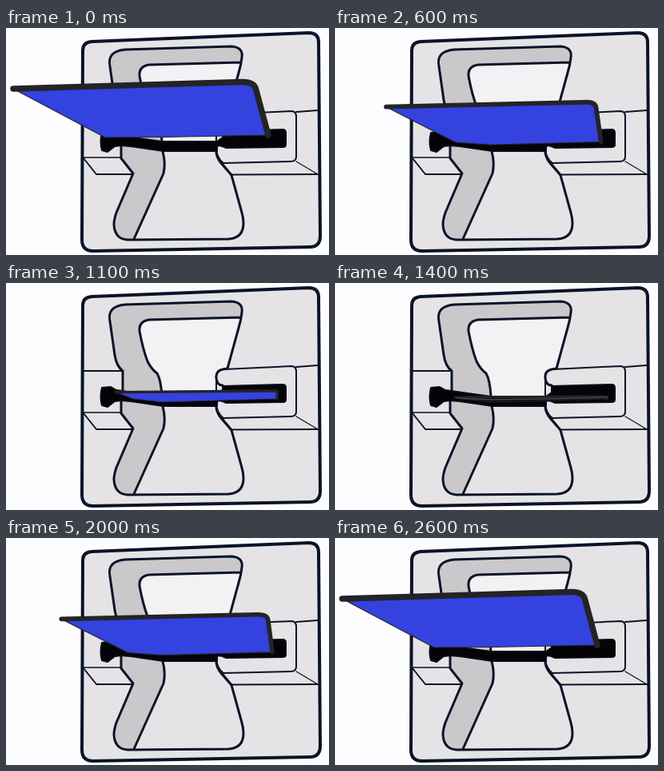
Animation, 404 px wide and 284 px high, one loop 2700 ms. Source, as an HTML page:

```html
<!DOCTYPE html>
<html lang="en">
<head>
<meta charset="utf-8">
<title>Folding flap</title>
<style>
html, body { margin: 0; width: 100%; height: 100%; overflow: hidden; background: #fdfcfe; }
svg { display: block; width: 404px; height: 284px; }
.line { fill: none; stroke: #0a1428; stroke-width: 3; stroke-linejoin: round; stroke-linecap: round; }
.thin { stroke-width: 2; }
.hair { stroke-width: 1.3; }
.plate { fill: #e5e3e5; }
.gray { fill: #cac8ca; }
.window { fill: #f2f1f3; }
.black { fill: #040407; stroke: #070c18; stroke-width: 2; stroke-linejoin: round; }
.flap { stroke: #242326; stroke-linejoin: round; stroke-linecap: round; }
</style>
</head>
<body>
<svg viewBox="0 0 404 284">
  <path class="plate line" style="stroke-width:4" d="M107 17L379 6Q391 6 391 18L393 260Q393 274 380 274L109 279Q95 279 95 265L96 28Q96 18 107 17Z"/>

  <!-- upper recess and window -->
  <path class="gray" d="M149 27L282 23Q297 24 295 37L294 43L179 46Q166 48 167 60Q171 82 177 98Q182 108 189 113Q194 122 195 142L146 134V110Q138 104 136 90L130 48Q126 29 149 27Z"/>
  <path class="window" d="M294 43L179 46Q166 48 167 60Q171 82 177 98Q182 108 189 113Q194 122 195 142H270L264 118L277 107Z"/>
  <path class="line" d="M146 134V110Q138 104 136 90L130 48Q126 29 149 27L282 23Q297 24 295 37Q294 46 291 56L277 107M294 43L179 46Q166 48 167 60Q171 82 177 98Q182 108 189 113Q194 122 195 142"/>

  <!-- lower recess -->
  <path class="gray" d="M144 147L196 154Q200 170 197 182L160 264H150Q135 262 135 248Q135 240 138 231L159 182L144 163Z"/>
  <path class="line" d="M196 154Q200 170 197 182L160 264M144 148V163L159 182L138 231Q135 240 135 246Q136 264 152 265L278 264Q297 263 297 244Q297 238 295 231L282 184"/>

  <!-- left block -->
  <path class="line thin" d="M97 110H146M97 163L113 183H158"/>
  <path class="line hair" d="M97 162H144"/>

  <!-- right block -->
  <path class="plate line thin" d="M272 108L357 104Q363 104 363 111V161Q363 167 356 167L272 169Q263 162 263 150V118Q263 109 272 108Z"/>
  <path class="line hair" d="M363 167L390 183"/>
  <path class="line thin" d="M363 105L390 103M270 169L282 183.5L390 183"/>
  <path class="line" d="M277 107L271 108Q262 110 263 119Q264 128 271 128M263 148V156Q264 163 269 169L282 184"/>

  <!-- slot and bar -->
  <path class="black" d="M120 131L131 130L138 134L195 142H264L271 137V129L346 127Q350 127 350 131V146Q350 149 346 149L275 150Q268 146 264 148V154H197L156 148L144 147L136 148L127 155L120 153Q117 142 120 131Z"/>

  <path id="face" class="flap" stroke-width="1.2"/>
  <path id="rim" class="flap" fill="none"/>
  <path id="shine" class="line hair" style="stroke:#4a4446" d="M152 144L195 146L262 145L341 143"/>
</svg>
<script>
const el = id => document.getElementById(id);
const LOOP = 2700, STEP = 100;

// time, how far the flap is open
const keys = [[0, 1], [400, 0.71], [600, 0.61], [800, 0.37], [1200, 0], [1400, 0],
  [1800, 0.42], [2200, 0.725], [2400, 0.966], [2500, 1], [LOOP, 1]];

const mix = (a, b, k) => a + (b - a) * k;
const between = (p, q, k) => p.map((v, i) => mix(v, q[i], k));

function openAt(t) {
  const i = keys.findIndex(k => k[0] > t);
  const [a, u] = keys[i - 1], [b, v] = keys[i];
  return mix(u, v, (t - a) / (b - a));
}

function draw(now) {
  const t = Math.floor(now % LOOP / STEP) * STEP;
  const u = openAt(t), shut = u === 0;
  const rise = u + 0.35 * u * u * (1 - u), sink = u ** 3;

  // free edge swings up, hinge edge barely moves
  const tip = [150 - 141 * u, 143 - 67 * rise];
  const corner = [341 - 31 * u ** 1.4, 142 - 75 * rise];
  const right = [340 - 12 * u, 145 - 11 * sink];
  const middle = [195, 149 - 12.5 * sink];
  const left = [159 - 35 * sink, 145 - 8 * sink];

  const rim = `M${tip}L${between(tip, corner, 0.95)}Q${corner} ${between(corner, right, 0.14)}L${right}`;
  el("rim").setAttribute("d", rim);
  el("rim").setAttribute("stroke-width", 3 + 4.5 * u);
  el("face").setAttribute("d", `${rim}L${middle}L${left}Z`);
  el("face").setAttribute("fill", shut ? "#0b0a0c" : "#3442e0");
  el("shine").setAttribute("visibility", shut ? "visible" : "hidden");
}

const start = performance.now();
function tick() {
  draw(performance.now() - start);
  requestAnimationFrame(tick);
}
tick();
</script>
</body>
</html>
```
